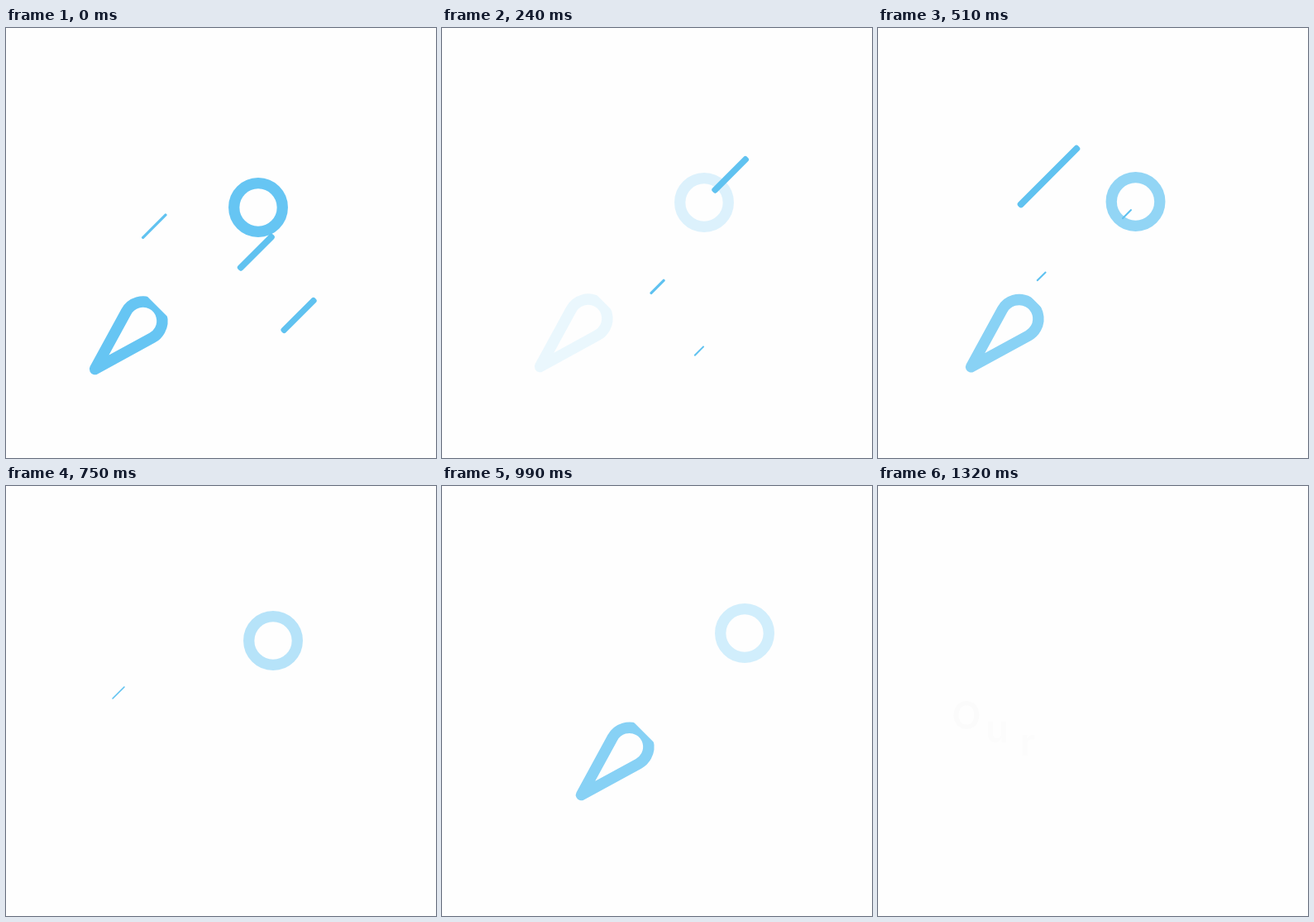
Write an HTML page with a canvas that moves like this. It is 520 px wide and 520 px high and loops after 1800 ms.

```html
<!DOCTYPE html>
<html lang="en">
<head>
<meta charset="utf-8">
<title>Launch</title>
<style>
  html, body { margin: 0; width: 100%; height: 100%; overflow: hidden; background: #fefefe; }
  canvas { display: block; width: 520px; height: 520px; }
</style>
</head>
<body>
<canvas id="stage" width="520" height="520"></canvas>
<script>
const ctx = document.getElementById('stage').getContext('2d');
const LOOP = 1800, STEP = 30, LANDED = 1320, BLUE = '#66c5f3';

// Key poses: time, window x, window y, window opacity, flame opacity
const poses = [
  [0, 305, 217, 1, 1],
  [240, 317, 211, .22, .13],
  [510, 311.5, 210, .7, .77],
  [600, 305, 217, .65, .5],
  [750, 323, 187, .48, 0],
  [990, 366, 178, .3, .78],
  [1140, 541, -2, .78, .97]
];

// Speed lines run down-left along x + y = lane: lane, length, x at peak, peak time, fade time
const lines = [
  [419, 103, 238, -200, 357],
  [573.5, 61, 311, -50, 515],
  [701.5, 63, 372, -100, 515],
  [526, 62, 361, 170, 515],
  [498, 60, 219, 385, 190],
  [386, 103, 209.4, 500, 357]
];
const GROW = 140;

const speedUp = p => p * (.4 + .6 * p);

// The last leg accelerates and carries on past its end
function poseAt(t) {
  const last = poses.length - 1;
  const next = poses.findIndex(k => k[0] > t);
  const i = next < 0 ? last : next;
  const a = poses[i - 1], b = poses[i];
  let p = (t - a[0]) / (b[0] - a[0]);
  if (i === last) p = speedUp(p);
  return a.map((v, n) => v + (b[n] - v) * p).slice(1);
}

function drawRing(x, y, alpha) {
  ctx.globalAlpha = Math.min(1, alpha);
  ctx.strokeStyle = BLUE;
  ctx.lineWidth = 13.3;
  ctx.beginPath();
  ctx.arc(x, y, 29.3, 0, Math.PI * 2);
  ctx.stroke();
  ctx.globalAlpha = 1;
}

function drawFlame(x, y, t, alpha) {
  const sway = Math.max(0, Math.sin(Math.PI * t / 1000));
  const dist = 82.3, r = 23.2, turn = Math.acos(r / dist);
  ctx.save();
  // The invisible hull cuts off the top of the flame
  ctx.translate(x, y);
  ctx.rotate(-Math.PI / 4);
  ctx.beginPath();
  ctx.rect(-771, -400, 600, 800);
  ctx.clip();

  ctx.rotate(Math.PI / 4);
  ctx.translate(-197.5 - 1.5 * sway, 195.5 + 4.4 * sway);
  ctx.rotate(-Math.PI / 4);
  ctx.beginPath();
  ctx.moveTo(0, 0);
  ctx.arc(dist, 0, r, Math.PI + turn, Math.PI * 3 - turn);
  ctx.closePath();
  ctx.lineJoin = 'round';
  ctx.lineWidth = 13.4;
  ctx.strokeStyle = BLUE;
  ctx.globalAlpha = Math.min(1, alpha);
  ctx.stroke();
  ctx.restore();
}

function drawLine([lane, len, peakX, peak, fade], t) {
  const age = t - peak;
  if (age <= -GROW || age >= fade) return;
  const size = age < 0 ? 1 + age / GROW : (1 + Math.cos(Math.PI * age / fade)) / 2;
  const x = peakX - age * len * .00285;
  ctx.save();
  ctx.translate(x, lane - x);
  ctx.rotate(-Math.PI / 4);
  ctx.scale(size, size);
  ctx.fillStyle = '#60c2f0';
  ctx.beginPath();
  ctx.roundRect(-len / 2, -4, len, 8, 3.3);
  ctx.fill();
  ctx.restore();
}

// Letters fade in one after another, each a little lower
function drawWord() {
  ctx.font = '600 46px Inter, Arial, sans-serif';
  ctx.textAlign = 'center';
  [...'Our'].forEach((ch, i) => {
    ctx.fillStyle = i ? '#fcfcfc' : '#fbfbfb';
    ctx.fillText(ch, 107 + 37 * i, 294 + 16 * i);
  });
}

function draw(t) {
  ctx.fillStyle = '#fefefe';
  ctx.fillRect(0, 0, 520, 520);
  if (t >= LANDED) return drawWord();
  const [x, y, ring, flame] = poseAt(t);
  drawFlame(x, y, t, flame);
  drawRing(x, y, ring);
  lines.forEach(line => drawLine(line, t));
}

const begin = performance.now();
function tick() {
  const t = (performance.now() - begin) % LOOP;
  draw(Math.floor(t / STEP) * STEP);
  requestAnimationFrame(tick);
}
tick();
</script>
</body>
</html>
```
